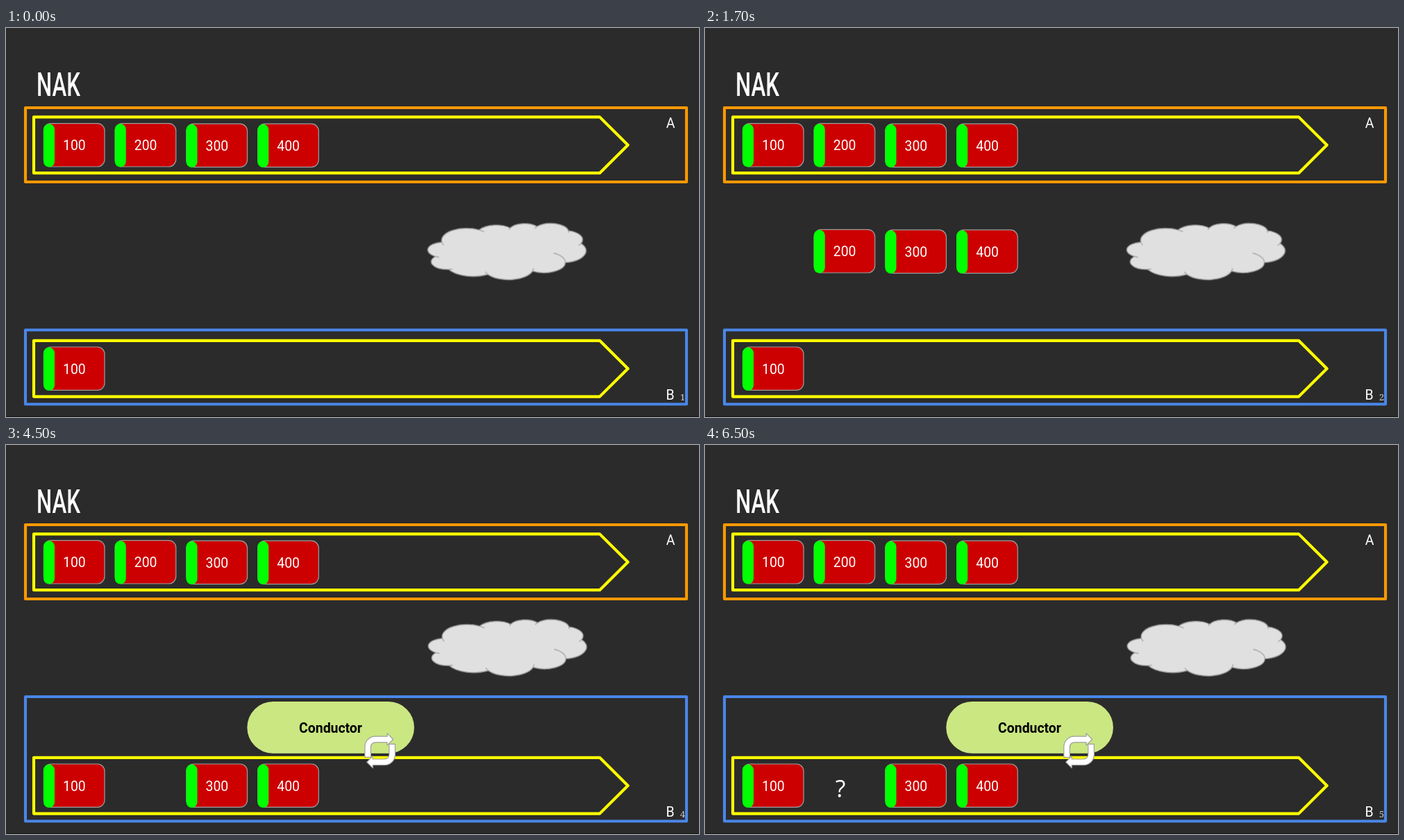
Animation of 998x561 px, one loop 8000 ms. Source, as an HTML page:

```html
<!DOCTYPE html>
<html lang="en">
<head>
<meta charset="utf-8">
<title>NAK</title>
<style>
html, body { margin: 0; width: 100%; height: 100%; overflow: hidden; background: #2b2b2b; }
svg { display: block; width: 100vw; height: 100vh; }
text { font: 19.4px Roboto, sans-serif; fill: #fff; text-anchor: middle; }
.title { font-size: 48px; font-weight: 500; text-anchor: start; }
.bold { font-weight: 700; fill: #000; }
.ask { font: 500 34px "Open Sans", sans-serif; }
.page { font: 13px "Noto Serif", serif; fill: #ccc; text-anchor: end; }
.frame { fill: none; stroke-width: 4.16; stroke-linejoin: round; }
.lane { stroke: #ff0; }
.thin { stroke: #9e9e9e; stroke-width: 1.2; stroke-linejoin: round; vector-effect: non-scaling-stroke; }

.step, .cloud { animation: 8s step-end infinite; }
.cloud { animation-name: lift; }
@keyframes only1 { 0% { opacity: 1 } 6.25%, 100% { opacity: 0 } }
@keyframes only2 { 0% { opacity: 0 } 6.25% { opacity: 1 } 31.25%, 100% { opacity: 0 } }
@keyframes only3 { 0% { opacity: 0 } 31.25% { opacity: 1 } 56.25%, 100% { opacity: 0 } }
@keyframes only4 { 0% { opacity: 0 } 56.25% { opacity: 1 } 81.25%, 100% { opacity: 0 } }
@keyframes only5 { 0% { opacity: 0 } 81.25%, 100% { opacity: 1 } }
@keyframes until3 { 0% { opacity: 1 } 56.25%, 100% { opacity: 0 } }
@keyframes from3 { 0% { opacity: 0 } 31.25%, 100% { opacity: 1 } }
@keyframes from4 { 0% { opacity: 0 } 56.25%, 100% { opacity: 1 } }
@keyframes lift { 0% { transform: none } 56.25%, 100% { transform: translate(.8px, -30px) } }
</style>
</head>
<body>
<svg viewBox="0 0 998 561" preserveAspectRatio="none">
  <defs>
    <path id="lane" class="frame lane" d="M40 128.4H855L895.6 168.8 855 209.2H40Z"/>
    <path id="turn" class="thin" fill="#fff" d="M516.8 450.4V435.3a15.1 15.1 0 0 1 15.1-15.1H549V415.9L557.6 424.5 549 433.1V428.8H531.9a6.5 6.5 0 0 0-6.5 6.5V450.4Z"/>
  </defs>
  <rect y="560" width="998" height="1" fill="#161616"/>
  <text class="title" transform="translate(44 98) scale(.65 1)">NAK</text>

  <rect class="frame" stroke="#ff9900" x="28" y="115" width="952" height="107"/>
  <use href="#lane"/>
  <text x="957" y="143.6">A</text>
  <g id="top"></g>

  <g id="sent" class="step" style="animation-name: only2"></g>
  <g id="lost" class="step" style="animation-name: only3"></g>
  <g class="cloud"><g id="cloud" transform="translate(607.3 281.6) scale(.996 .482)"></g></g>

  <rect class="frame step" style="animation-name: until3" stroke="#4a86e8" x="28" y="435.5" width="952" height="107"/>
  <rect class="frame step" style="animation-name: from4" stroke="#4a86e8" x="28" y="363" width="952" height="179.5"/>
  <use href="#lane" y="322.4"/>
  <text x="956.6" y="535.8">B</text>
  <g id="first"></g>
  <g id="rest" class="step" style="animation-name: from3"></g>

  <g class="step" style="animation-name: from4">
    <rect x="347.3" y="370" width="240.6" height="74.8" rx="37.4" fill="#cbe782"/>
    <text class="bold" x="467.5" y="414.6">Conductor</text>
    <use href="#turn"/>
    <use href="#turn" transform="rotate(180 538.6 440.9)"/>
  </g>
  <text class="ask step" style="animation-name: only5" x="195" y="508">?</text>
  <g id="pages"></g>
</svg>
<script>
const put = (id, markup) => { document.getElementById(id).innerHTML = markup; };

function card(n, y, lost) {
  const x = 54.4 + (n - 1) * 102.75;
  const bar = lost ? '' : `<rect x="${x - .4}" y="${y + .6}" width="16" height="62.4" rx="8" fill="#0f0"/>`;
  return `<rect class="thin" x="${x}" y="${y}" width="87.6" height="62.4" rx="10.4" fill="${lost ? '#000' : '#c00'}"/>
    ${bar}<text x="${x + 44}" y="${y + 38.7}">${n}00</text>`;
}
const row = (y, ...ns) => ns.map(n => card(n, n > 2 && y < 460 ? y + .6 : y)).join('');
put('top', row(137.6, 1, 2, 3, 4));
put('sent', row(290.6, 2, 3, 4));
put('lost', card(2, 290.6, true));
put('first', row(460, 1));
put('rest', row(460, 3, 4));

put('pages', [1, 2, 3, 4, 5].map(n =>
  `<text class="page step" style="animation-name: only${n}" x="978" y="537.4">${n}</text>`).join(''));

// Cloud: a clockwise ring of overlapping circles, squashed by its group
const lobes = [
  [56, 51, 36], [99, 33.5, 28], [140, 24, 23], [178, 26, 25.7], [196, 49, 28], [193, 82, 36],
  [168, 117, 31], [117, 133, 36], [66, 118, 41], [28, 115, 23], [23, 79.5, 23]
];
// Which lobe of each neighbouring pair lies in front: the earlier or the later
const front = '><<>><<><<<';

// Outer crossing of two neighbouring circles
function crossing([ax, ay, ar], [bx, by, br]) {
  const dx = bx - ax, dy = by - ay, d = Math.hypot(dx, dy);
  const along = (d * d + ar * ar - br * br) / (2 * d);
  const out = Math.sqrt(Math.max(0, ar * ar - along * along));
  return [ax + (dx * along + dy * out) / d, ay + (dy * along - dx * out) / d];
}

let outline = '', creases = '';
lobes.forEach((lobe, i) => {
  const next = lobes[(i + 1) % lobes.length];
  const [x, y] = crossing(lobe, next);
  outline += i ? `A${lobe[2]} ${lobe[2]} 0 0 1 ${x} ${y}` : `M${x} ${y}`;

  // The front lobe's edge runs on into the cloud, furthest at the lower right
  const ahead = front[i] === '>';
  const [cx, cy, r] = ahead ? lobe : next;
  const turn = (ahead ? 1 : -1) * (i === 5 ? 64 : 14) * Math.PI / 180;
  const angle = Math.atan2(y - cy, x - cx) + turn;
  creases += `M${x} ${y}A${r} ${r} 0 0 ${+ahead} ${cx + r * Math.cos(angle)} ${cy + r * Math.sin(angle)}`;
});
const [sx, sy] = crossing(lobes[0], lobes[1]);
outline += `A${lobes[0][2]} ${lobes[0][2]} 0 0 1 ${sx} ${sy}Z`;
put('cloud', `<path class="thin" fill="#e0e0e0" d="${outline}"/><path class="thin" fill="none" d="${creases}"/>`);
</script>
</body>
</html>
```
